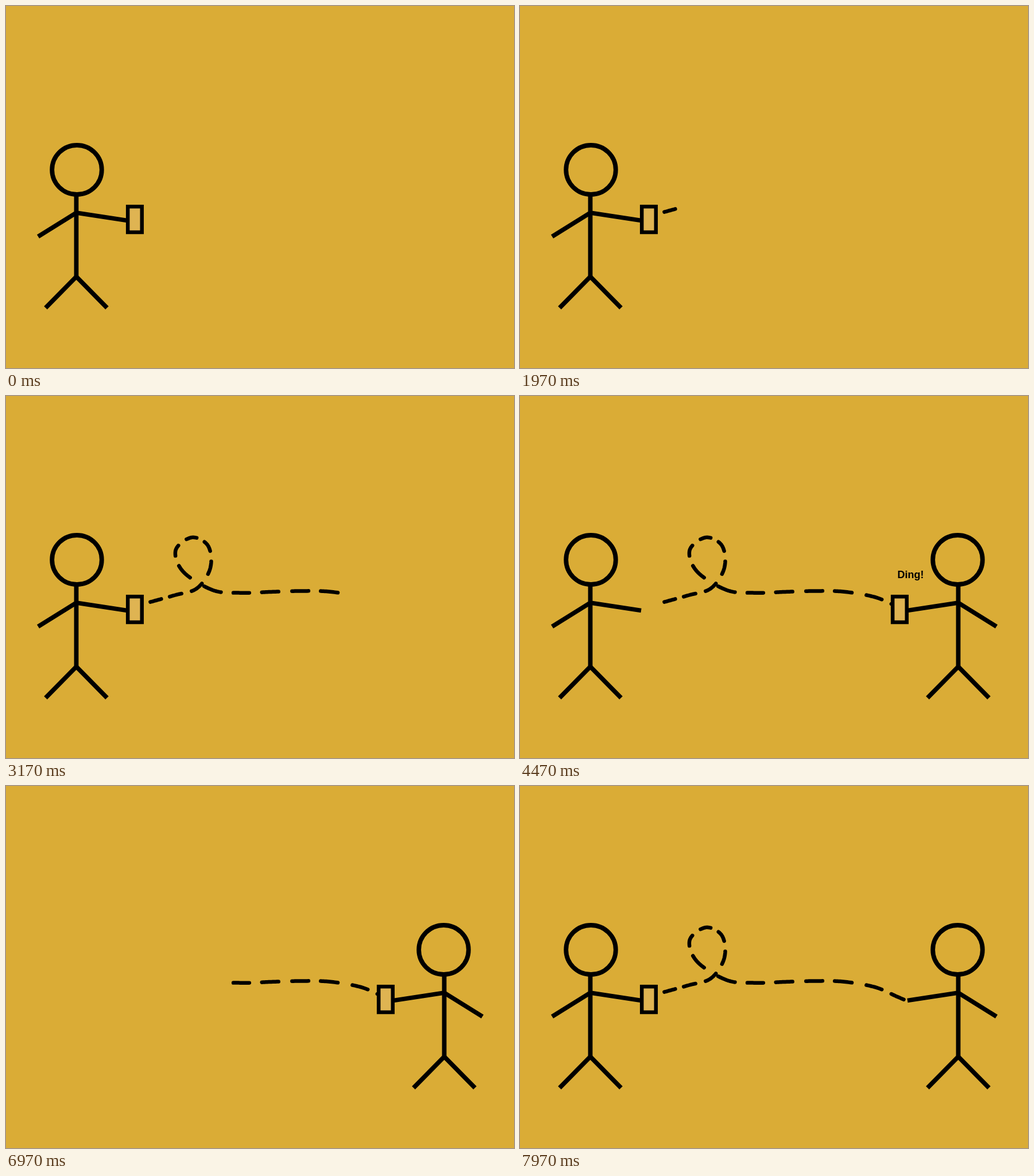
Write an HTML page with a canvas that moves like this. It is 885 px wide and 632 px high and loops after 8000 ms.

```html
<!DOCTYPE html>
<html lang="en">
<head>
<meta charset="utf-8">
<title>Message back and forth</title>
<style>
  html, body { margin: 0; width: 100%; height: 100%; overflow: hidden; background: #daac36; }
  canvas { display: block; }
</style>
</head>
<body>
<canvas id="stage" width="885" height="632"></canvas>
<script>
const ctx = document.getElementById('stage').getContext('2d');
const LOOP = 8000, STEP = 100;
const SEND = 1970, ARRIVE = 3470, DING = 4470, CLEAR = 5470, REPLY = 6470, RETURN = 7970;
const MIRROR = 886;
const DASH_HALF = 0.28;

// Flight path waypoints; one dash is centred on each
const path = [
  [261, 357], [295, 347.5], [333, 335.5], [356, 300], [352, 261.5],
  [323.5, 247], [295.5, 269.5], [309, 307], [360.5, 339], [410, 343.7],
  [460, 342], [513, 340.5], [562.5, 341.5], [618, 351], [657.5, 368]
];

// Catmull-Rom position at u, running straight on beyond both ends
function pathPoint(u) {
  const last = path.length - 1;
  const i = Math.max(0, Math.min(last - 1, Math.floor(u)));
  const f = u - i;
  return [0, 1].map(axis => {
    const b = path[i][axis], c = path[i + 1][axis];
    const a = i > 0 ? path[i - 1][axis] : 2 * b - c;
    const d = i + 1 < last ? path[i + 2][axis] : 2 * c - b;
    if (f < 0) return b + f * (c - b);
    if (f > 1) return c + (f - 1) * (c - b);
    return b + f / 2 * (c - a + f * (2 * a - 5 * b + 4 * c - d + f * (3 * (b - c) + d - a)));
  });
}

function polyline(...points) {
  ctx.beginPath();
  points.forEach(([x, y]) => ctx.lineTo(x, y));
  ctx.stroke();
}

function drawPerson(hasPhone, mirrored) {
  ctx.save();
  if (mirrored) ctx.transform(-1, 0, 0, 1, MIRROR, 0);
  ctx.lineWidth = 7.8;
  ctx.beginPath();
  ctx.ellipse(123.5, 286, 43.3, 43, 0, 0, Math.PI * 2);
  ctx.stroke();
  polyline([122.5, 330], [122.5, 473]);
  polyline([56, 402.5], [122.5, 361], [211, 374.5]);
  polyline([69, 527], [122.5, 472.5], [176, 527]);
  if (hasPhone) {
    ctx.fillStyle = '#dfb452';
    ctx.lineWidth = 6.5;
    ctx.fillRect(212.2, 350.2, 24.6, 44.8);
    ctx.strokeRect(212.2, 350.2, 24.6, 44.8);
  }
  ctx.restore();
}

function drawTrail(from, to) {
  ctx.save();
  ctx.lineWidth = 6.5;
  ctx.lineCap = ctx.lineJoin = 'round';
  for (let i = from; i < to; i++) {
    const points = Array.from({ length: 13 }, (_, k) => pathPoint(i + DASH_HALF * (k / 6 - 1)));
    polyline(...points);
  }
  ctx.restore();
}

// Number of dashes laid down since the given start
function dashCount(t, start) {
  const n = Math.floor((t - start) / STEP) + 1;
  return Math.max(0, Math.min(path.length, n));
}

function draw(t) {
  ctx.fillStyle = '#daac36';
  ctx.fillRect(0, 0, 885, 632);
  ctx.strokeStyle = '#000';

  if (t < CLEAR) drawTrail(0, dashCount(t, SEND));
  else drawTrail(path.length - dashCount(t, REPLY), path.length);

  if (t < CLEAR || t >= RETURN) drawPerson(t < ARRIVE || t >= RETURN, false);
  if (t >= ARRIVE) drawPerson(t < RETURN, true);

  if (t >= DING && t < CLEAR) {
    ctx.fillStyle = '#000';
    ctx.font = 'bold 18px "Liberation Sans", Arial, sans-serif';
    ctx.fillText('Ding!', 657.5, 318);
  }
}

const begin = performance.now();
function tick() {
  draw((performance.now() - begin) % LOOP);
  requestAnimationFrame(tick);
}
tick();
</script>
</body>
</html>
```
